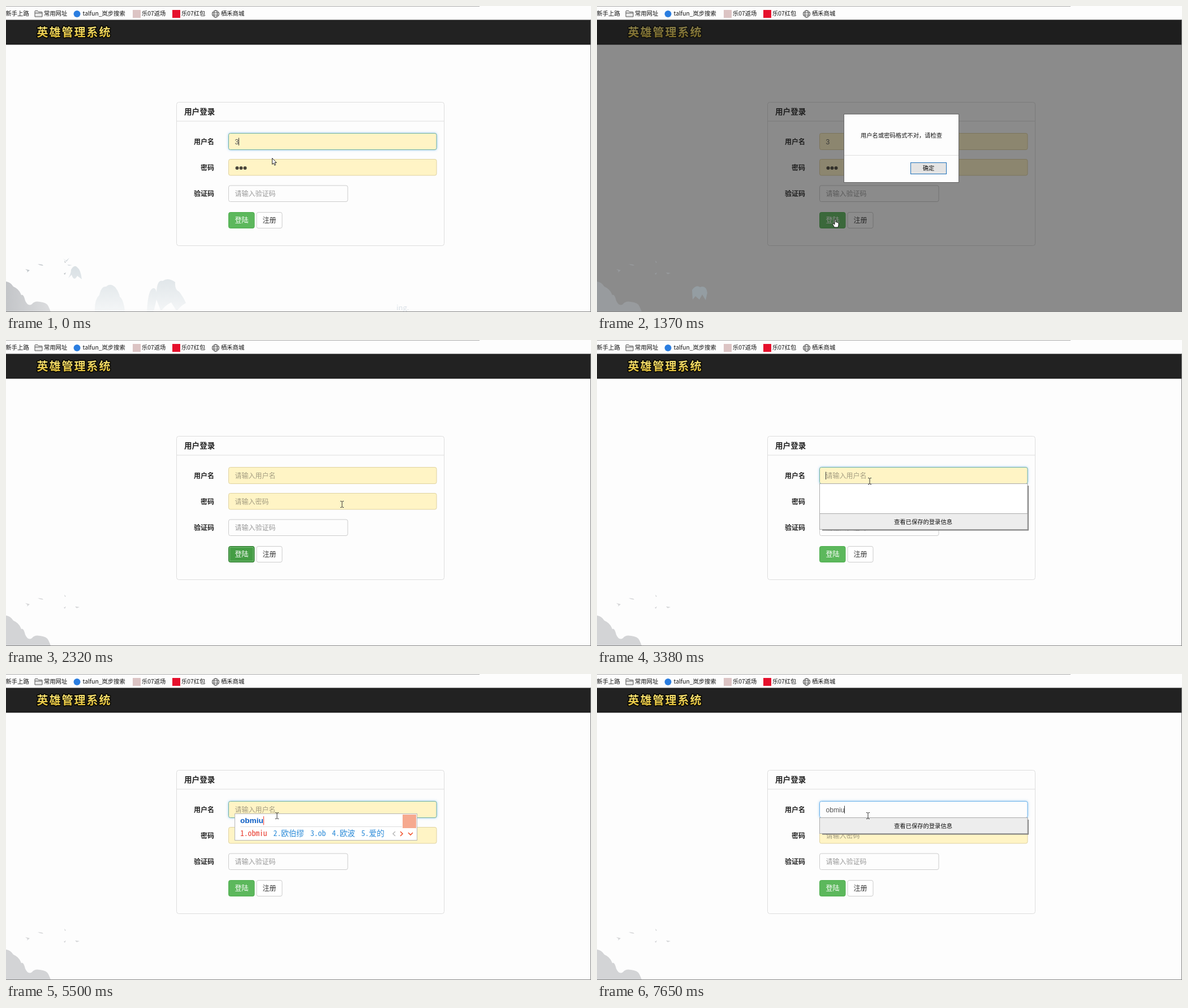
An HTML page that plays this animation: 1034x542 px, repeating every 8 s.

```html
<!DOCTYPE html>
<html lang="zh-CN">
<head>
<meta charset="utf-8">
<title>用户登录</title>
<style>
  html, body { margin: 0; width: 100%; height: 100%; overflow: hidden; background: #fdfdfd; }
  svg { display: block; width: 1034px; height: 542px; font: 12px "Noto Sans CJK SC", "Noto Sans CJK", "Noto Sans", sans-serif; }
  text { white-space: pre; }
  .off { display: none; }
  .ui { font-size: 10.3px; fill: #111; }
  .label { font-weight: 700; text-anchor: end; fill: #222; }
  .hint { fill: #999; }
  .field { fill: #fdfdfd; stroke: #ccc; }
  .saved { fill: #fff4c5; stroke: #dfd2a0; }
  .saved + .hint { fill: #a39c80; }
  .focus { stroke: #66afe9; filter: url(#glow); }
  .focus.saved { stroke: #6db0a4; }
  .typed { font: 12.1px "Liberation Sans", Arial, sans-serif; fill: #555; }
  .normal { fill: #5cb85c; stroke: #4cae4c; }
  .hover { fill: #449d44; stroke: #398439; }
  .focused { fill: #449d44; stroke: #2f7a2f; }
  .active { fill: #398439; stroke: #255625; }
  .spell { font: 700 13.6px "Liberation Sans", Arial, sans-serif; fill: #0a5cc4; }
  .pick { font: 13.6px "Noto Sans Mono CJK SC", "Noto Sans CJK SC", "Noto Sans CJK", monospace; fill: #2a8ad8; }
  .pick:first-child { fill: #e8382c; }
</style>
</head>
<body>
<svg viewBox="0 0 1034 542">
  <defs>
    <filter id="glow" x="-5%" y="-40%" width="110%" height="180%">
      <feDropShadow dx="0" dy="0" stdDeviation="2" flood-color="#66afe9" flood-opacity=".65"/>
    </filter>
    <linearGradient id="gold" x2="0" y2="1"><stop stop-color="#fff08a"/><stop offset="1" stop-color="#dfb92c"/></linearGradient>
    <linearGradient id="mist" x2="0" y2="1"><stop stop-color="#d9e0e4"/><stop offset="1" stop-color="#f4f6f7"/></linearGradient>
    <linearGradient id="rock" x2="1" y2="0"><stop stop-color="#c3c5c8"/><stop offset="1" stop-color="#dcdddf"/></linearGradient>
    <path id="ridge" d="M0 488Q8 489 13 497Q23 501 27 512Q31 509 34 522Q39 533 46 528Q50 522 60 524Q72 525 75 532L79 541H0Z"/>
    <path id="birds" d="M34 466l8 2-5 4 1-3zM56 457l8 1 2 2-6-1zM103 451l3 3-2 1zM102 474l4-2-2 4zM122 472l8 1-5 2z"/>
  </defs>

  <rect width="1034" height="542" fill="#fdfdfd"/>

  <g id="hills">
    <use href="#ridge" fill="url(#rock)"/>
    <use href="#birds" fill="#bfc4c8"/>
    <path fill="#d3d9dd" d="M101 447l5 4 6-5-5 7zM108 458l9 1-6 1z"/>
    <path fill="url(#mist)" d="M110 482Q115 474 115 467Q121 457 126 463Q132 467 134 484L126 478Q120 489 116 476ZM157 541Q156 520 165 512Q168 496 177 497Q184 490 193 498Q200 507 201 515Q208 520 210 541ZM249 541Q251 505 258 501Q264 497 266 507Q267 484 277 487Q286 480 299 489Q298 503 306 506Q314 516 318 526Q306 533 302 541L292 525Q280 531 274 541L266 520 261 541Z"/>
    <text x="690" y="539" font-size="13" fill="#dce2e8">ing.</text>
  </g>
  <g id="flat" fill="#d3d4d6"><use href="#ridge"/><use href="#birds"/></g>

  <path fill="#222" d="M0 24.500H1034V68H0Z"/>
  <path stroke="#090909" d="M0 68H1034"/>
  <text x="54.500" y="53.500" font-size="20" font-weight="700" letter-spacing="2" fill="url(#gold)" stroke="#0b0a05" stroke-width="3.500" paint-order="stroke" stroke-linejoin="round">英雄管理系统</text>

  <path stroke="#aaa" d="M0 .5H837"/>
  <g class="ui">
    <text x="-.5" y="17">新手上路</text>
    <path fill="#e8e8e8" stroke="#555" d="M51 19V9.500q0-1 1-1h4l1.500 2H63q1 0 1 1V19ZM51 12.500H64"/>
    <text x="67" y="17">常用网址</text>
    <circle cx="125.500" cy="14" r="6" fill="#2a7de0"/>
    <text x="135.500" y="17">talfun_岚步搜索</text>
    <rect x="224" y="7" width="14" height="14" fill="#dcc4c4"/>
    <text x="240" y="17">乐07返场</text>
    <rect x="294" y="7" width="14" height="14" fill="#e6102c"/>
    <text x="310" y="17">乐07红包</text>
    <g fill="none" stroke="#444"><circle cx="370.500" cy="14" r="6"/><ellipse cx="370.500" cy="14" rx="3" ry="6"/><path d="M364.500 12H376.500M364.500 16H376.500"/></g>
    <text x="380" y="17">栖禾商城</text>
  </g>

  <rect x="301.500" y="170.500" width="473" height="254" rx="4" fill="#fdfdfd" stroke="#ddd"/>
  <path stroke="#ddd" d="M302 204H774"/>
  <text x="315" y="192" font-size="13.600" font-weight="700" fill="#222">用户登录</text>
  <text class="label" x="368" y="244.500">用户名</text>
  <text class="label" x="368" y="290.500">密码</text>
  <text class="label" x="368" y="336.500">验证码</text>

  <rect id="user" x="393.500" y="225.500" width="367.500" height="29" rx="3"/>
  <text id="userHint" class="hint" x="404.500" y="244.500">请输入用户名</text>
  <text id="userText" class="typed" x="404.500" y="244.500"></text>
  <path id="caret" stroke="#333" d="M.5 233.500V247"/>
  <rect class="field saved" x="393.500" y="271.500" width="367.500" height="28.500" rx="3"/>
  <text id="passHint" class="hint" x="404.500" y="290.500">请输入密码</text>
  <g id="dots" fill="#4a463a"><circle cx="408.500" cy="287" r="3"/><circle cx="415.500" cy="287" r="3"/><circle cx="422.500" cy="287" r="3"/></g>
  <rect class="field" x="393.500" y="318" width="210.500" height="28.500" rx="3"/>
  <text class="hint" x="404.500" y="336.500">请输入验证码</text>

  <rect id="login" x="393.500" y="365.500" width="45.500" height="28" rx="3"/>
  <rect id="ring" x="395.500" y="367.500" width="41.500" height="24" fill="none" stroke="#9fd09f" stroke-dasharray="1 1"/>
  <text x="404.500" y="383.500" fill="#fff">登陆</text>
  <rect x="443" y="365.500" width="45" height="28" rx="3" fill="#fff" stroke="#ccc"/>
  <text x="453.500" y="383.500" fill="#333">注册</text>

  <g id="list">
    <rect id="listShade" x="398" y="258" width="365" fill="#7d7d7d"/>
    <rect id="listBox" x="393.500" y="254.500" width="367.500" fill="#fff" stroke="#aaa"/>
    <g id="listFoot">
      <path fill="#ededed" stroke="#aaa" d="M393.500 254.500H761V282.500H393.500Z"/>
      <text class="ui" x="576.500" y="272.500" text-anchor="middle">查看已保存的登录信息</text>
    </g>
  </g>

  <g id="ime">
    <rect id="imeBox" x="404.500" y="247.500" height="47" fill="#fff" stroke="#b5b5b5"/>
    <path id="imeLine" stroke="#ddd"/>
    <text id="spell" class="spell" x="414" y="264"></text>
    <path id="imeCaret" stroke="#f03a30" d="M.5 252V267.500"/>
    <g id="picks"></g>
    <g id="imeEnd" fill="none" stroke-width="1.600">
      <rect x="-26" y="249" width="24" height="24" fill="#f6a98f"/>
      <path stroke="#bbb" d="M-39 279l-4 4 4 4"/>
      <path stroke="#f0522c" d="M-30 279l4 4-4 4M-16 281l4 4 4-4"/>
    </g>
    <g id="tool">
      <g id="toolIcon" stroke="#f2835c" fill="none"><circle cx="502.500" cy="260" r="5.500"/><path d="M502.500 256.500v1.500M502.500 259.500v4"/></g>
      <text x="513" y="263" fill="#0a5cc4" font-size="10" font-family="'Noto Sans Mono CJK SC','Noto Sans CJK SC',monospace">工具箱(分号)</text>
    </g>
  </g>

  <g id="alert">
    <path fill="#1a1a1a" fill-opacity=".5" d="M0 24.500H1034V542H0Z"/>
    <g fill="#989b9e"><use href="#ridge"/><use href="#birds"/><path fill="#949da2" d="M168 503Q175 493 182 498Q193 494 195 508L192 521 186 511 181 520 174 514 169 520Z"/></g>
    <rect x="436.500" y="191.500" width="203" height="121" fill="#fdfdfd" stroke="#666"/>
    <path stroke="#e0e0e0" d="M437 264.500H639"/>
    <path id="shade1" fill="#f0f0f0" d="M437 303H551V312H437Z"/>
    <path id="shade2" fill="#f0f0f0" d="M543 278H617V312H543Z"/>
    <text class="ui" x="466" y="232.500">用户名或密码格式不对，请检查</text>
    <rect id="ok" x="554.500" y="277.500" width="63" height="20" stroke="#1d6fb8"/>
    <text class="ui" x="586" y="291" text-anchor="middle">确定</text>
  </g>

  <path stroke="#858585" d="M0 541.500H1034M1033.500 24V542"/>

  <g id="cursor">
    <path id="arrow" fill="#fff" stroke="#111" stroke-width=".9" d="M.5 .5V11.500L3 9.200 4.800 13.200 6.600 12.400 4.900 8.500H8.200Z"/>
    <path id="beam" fill="none" stroke="#333" d="M-3-5.500H-1L0-4.500 1-5.500H3M0-5V5M-3 5.500H-1L0 4.500 1 5.500H3"/>
    <path id="hand" fill="#fff" stroke="#111" stroke-width=".9" d="M-1 0q1-1 2 0V5l1-.5 1 1 1-.4 1 1 1 0V10L5 14H-1.500L-4.500 8.500q0-1.500 1.500-1L-1 9Z"/>
  </g>
</svg>

<script>
const LOOP = 8000;
const $ = id => document.getElementById(id);
const show = (id, on) => $(id).classList.toggle("off", !on);
const attr = (id, values) => { for (const k in values) $(id).setAttribute(k, values[k]); };

const START = {
  cur: ["arrow", 470, 269], text: "3", filled: true, saved: true, focus: true, caret: 411,
  btn: "normal", alert: 0, scene: "hills", list: 0, ime: "", picks: "", tool: 0, icon: 1
};

// Each step: time in ms and the parts of the state that change.
const STEPS = [
  [140, { cur: ["beam", 460, 290], caret: 0 }],
  [290, { cur: ["beam", 446, 325] }],
  [440, { cur: ["beam", 441, 336] }],
  [560, { cur: ["beam", 437, 343], caret: 411 }],
  [680, { cur: ["arrow", 433, 347] }],
  [980, { cur: ["hand", 422, 376], btn: "hover" }],
  [1100, { cur: ["hand", 421, 378], caret: 0 }],
  [1250, { btn: "active", focus: false }],
  [1370, { btn: "normal", alert: 1, scene: "" }],
  [1780, { cur: ["arrow", 543, 303], alert: 2 }],
  [1930, { cur: ["arrow", 593, 290], alert: 3 }],
  [2320, { cur: ["beam", 594, 291], alert: 0, scene: "flat", text: "", filled: false, btn: "focused" }],
  [2470, { cur: ["beam", 568, 276] }],
  [2590, { cur: ["beam", 521, 259] }],
  [2710, { cur: ["beam", 490, 252] }],
  [2860, { cur: ["beam", 485, 250], focus: true, caret: 404, btn: "normal" }],
  [2980, { cur: ["beam", 484, 250], list: 81 }],
  [3380, { cur: ["beam", 482, 250] }],
  [3530, { cur: ["beam", 479, 251], caret: 0 }],
  [3900, { caret: 404 }],
  [4640, { caret: 0, list: 0, ime: "ob", picks: "ob 欧波 爱的 欧北 挨打" }],
  [5040, { caret: 404 }],
  [5190, { ime: "obm", picks: "obm 欧波 爱的 欧北 挨打" }],
  [5500, { caret: 0, ime: "obmiu", picks: "obmiu 欧伯缪 ob 欧波 爱的" }],
  [5780, { tool: .5 }],
  [5900, { tool: 1 }],
  [6050, { caret: 404, icon: .5 }],
  [6170, { icon: 1 }],
  [6570, { caret: 0 }],
  [6940, { ime: "", tool: 0, text: "obmiu", saved: false, caret: 437 }],
  [7060, { list: 28 }],
  [7210, { caret: 0 }],
  [7650, { caret: 437 }]
];

function drawIme(s) {
  show("ime", s.ime);
  if (!s.ime) return;
  $("spell").textContent = s.ime;
  const caretX = 414 + Math.round($("spell").getComputedTextLength());
  attr("imeCaret", { transform: `translate(${caretX})` });
  let x = 414;
  $("picks").replaceChildren(...s.picks.split(" ").map((word, i) => {
    const el = document.createElementNS("http://www.w3.org/2000/svg", "text");
    el.setAttribute("class", "pick");
    el.setAttribute("x", x);
    el.setAttribute("y", 287);
    el.textContent = `${i + 1}.${word}`;
    const cells = [...word].reduce((n, c) => n + (c > "z" ? 2 : 1), 2);
    x += cells * 6.8 + 11;
    return el;
  }));
  const right = Math.round(x + 47);
  attr("imeBox", { width: right - 405 });
  attr("imeLine", { d: `M414 270.500H${right - 27}` });
  attr("imeEnd", { transform: `translate(${right})` });
  show("tool", s.tool);
  attr("tool", { opacity: s.tool });
  attr("toolIcon", { opacity: s.icon });
}

function draw(s) {
  const [kind, x, y] = s.cur;
  for (const id of ["arrow", "beam", "hand"]) show(id, id === kind);
  attr("cursor", { transform: `translate(${x} ${y})` });

  attr("user", { class: `field${s.saved ? " saved" : ""}${s.focus ? " focus" : ""}` });
  $("userText").textContent = s.text;
  show("userHint", !s.text);
  show("passHint", !s.filled);
  show("dots", s.filled);
  show("caret", s.caret);
  attr("caret", { transform: `translate(${s.caret})` });

  attr("login", { class: s.btn });
  show("ring", s.btn === "active" || s.btn === "focused");
  show("hills", s.scene === "hills");
  show("flat", s.scene === "flat");

  show("alert", s.alert);
  show("shade1", s.alert > 1);
  show("shade2", s.alert > 2);
  attr("ok", { fill: s.alert > 2 ? "#cce4f7" : "#e4e4e4" });

  show("list", s.list);
  attr("listBox", { height: s.list });
  attr("listShade", { height: Math.max(0, s.list - 1.5) });
  attr("listFoot", { transform: `translate(0 ${s.list - 28})` });
  drawIme(s);
}

let last = -1;
function tick() {
  const t = performance.now() % LOOP;
  const count = STEPS.filter(([at]) => at <= t).length;
  if (count !== last) {
    last = count;
    draw(Object.assign({}, START, ...STEPS.slice(0, count).map(step => step[1])));
  }
  requestAnimationFrame(tick);
}
tick();
</script>
</body>
</html>
```
